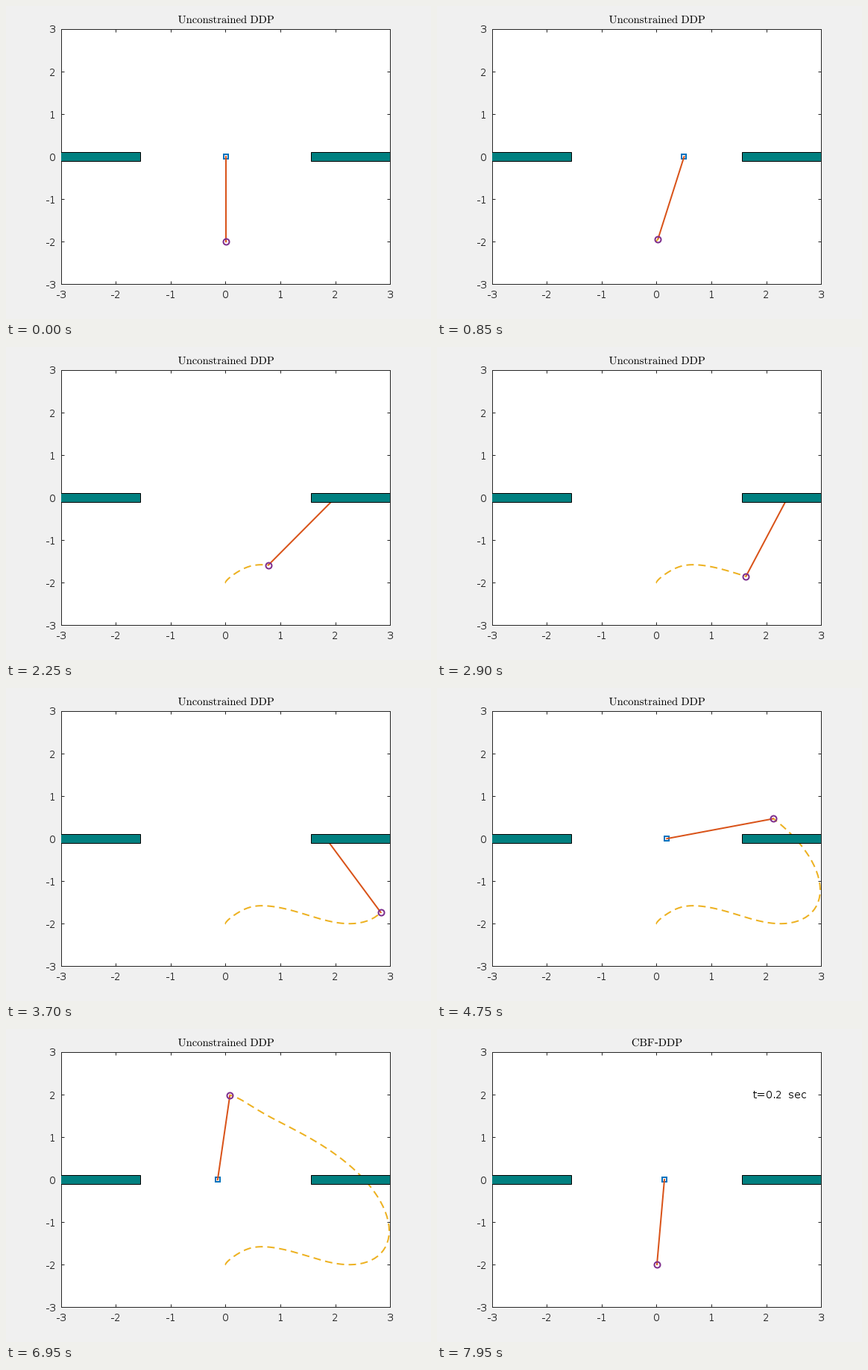
A matplotlib script for the animation above (8 s loop, 570x420 px).

```python
import numpy as np
import matplotlib.pyplot as plt
from matplotlib.animation import FuncAnimation
from matplotlib.patches import PathPatch, Rectangle
from matplotlib.textpath import TextPath
from matplotlib.transforms import Affine2D

W, H, DPI = 570, 420, 96
FRAMES, STEP_MS = 160, 50
SWITCH = 151          # frame at which the second run starts
DT = 0.02             # simulated seconds per step
ROD = 2.0
INK = "#262626"
BLUE, ORANGE, YELLOW, PURPLE = "#0072BD", "#D95319", "#EDB120", "#7E2F8E"

plt.rcParams.update({
    "font.family": "DejaVu Sans",
    "font.size": 10.5,
    "mathtext.fontset": "cm",
    "text.hinting": "default",
    "text.hinting_factor": 1,
})

# Key poses of the swing-up: (step, cart position, rod angle)
POSES = [(0, 0, 0), (17, .55, -.265), (31, 1.38, -.57), (43, 1.95, -.66),
         (57, 2.38, -.389), (73, 1.825, .521), (94, .18, 1.808),
         (118, -.565, 2.532), (149, 0, np.pi)]


def spline(x, y, t):
    """Smooth cubic spline through (x, y), at rest at both ends."""
    n, h, d = len(x), np.diff(x), np.diff(y) / np.diff(x)
    a, b = np.eye(n), np.zeros(n)
    for i in range(1, n - 1):
        a[i, i - 1:i + 2] = h[i], 2 * (h[i - 1] + h[i]), h[i - 1]
        b[i] = 3 * (h[i] * d[i - 1] + h[i - 1] * d[i])
    m = np.linalg.solve(a, b)
    i = np.clip(np.searchsorted(x, t, side="right") - 1, 0, n - 2)
    u = (t - x[i]) / h[i]
    return ((1 + 2 * u) * (1 - u) ** 2 * y[i] + u * (1 - u) ** 2 * h[i] * m[i]
            + u * u * (3 - 2 * u) * y[i + 1] + u * u * (u - 1) * h[i] * m[i + 1])


def run_data(cart, angle):
    return cart, cart + ROD * np.sin(angle), -ROD * np.cos(angle)


def swing_up():
    key, cart, angle = np.array(POSES).T
    steps = np.arange(SWITCH - 1)
    return run_data(spline(key, cart, steps), spline(key, angle, steps))


def pull_away():
    # The cart accelerates while the bob still hangs in place.
    cart = 0.136 * (np.arange(FRAMES - SWITCH) / 8) ** 2
    return run_data(cart, -np.arcsin(cart / ROD))


RUNS = [swing_up(), pull_away()]

fig = plt.figure(figsize=(W / DPI, H / DPI), dpi=DPI, facecolor="#f0f0f0")
ax = fig.add_axes([73.6 / W, 46.7 / H, 441.75 / W, 342.3 / H])
ax.set(xlim=(-3, 3), ylim=(-3, 3))
ticks = range(-3, 4)
ax.set_xticks(ticks, [str(v) for v in ticks])
ax.set_yticks(ticks, [str(v) for v in ticks])
ax.tick_params(direction="in", top=True, right=True, length=3.3, width=0.75,
               color=INK, labelcolor=INK, pad=5)
ax.tick_params(axis="x", pad=6)
for side in ax.spines.values():
    side.set(color=INK, linewidth=0.75)

for left in (-6, 1.55):
    ax.add_patch(Rectangle((left, -0.1), 4.45, 0.2, facecolor=(0, .5, .5),
                           edgecolor="black", linewidth=0.75, zorder=5))


def line(marker="", **style):
    """Empty plot line, unsnapped and centred on the pixel grid."""
    artist, = ax.plot([], [], marker, lw=1.5, mfc="none", mew=1.5, **style)
    artist.set_transform(Affine2D().translate(0.5, 0) + ax.transData
                         if False else ax.transData + Affine2D().translate(0.5, 0))
    artist.set_snap(False)
    return artist


cart = line("s", ms=4.9, mec=BLUE, zorder=3)
rod = line(color=ORANGE, zorder=3.1)
trace = line(color=YELLOW, dashes=(5, 3), dash_capstyle="butt", zorder=3.2)
bob = line("o", ms=6, mec=PURPLE, zorder=3.3, clip_on=False)


def make_title(text):
    path = TextPath((0, 0), text, size=11 * DPI / 72)
    box = path.get_extents()
    place = Affine2D().translate(295 - (box.x0 + box.x1) / 2, H - 23)
    return fig.add_artist(PathPatch(path, fc="black", lw=0, transform=place))


titles = [make_title(r"$\mathrm{Unconstrained\ DDP}$"),
          make_title(r"$\mathrm{CBF}$-$\mathrm{DDP}$")]
clock = fig.text(423.6 / W, 1 - 93 / H, "", va="baseline")


def draw(frame):
    run = int(frame >= SWITCH)
    k = frame - SWITCH if run else max(0, frame - 1)
    cx, bx, by = RUNS[run]
    cart.set_data([cx[k]], [0])
    rod.set_data([cx[k], bx[k]], [0, by[k]])
    trace.set_data(bx[:k + 1], by[:k + 1])
    bob.set_data([bx[k]], [by[k]])
    bob.set_visible(bx[k] <= 3)
    for i, title in enumerate(titles):
        title.set_visible(i == run)
    clock.set_text(f"t={k * DT:.1f}  sec" if run else "")
    return cart, rod, trace, bob, *titles, clock


anim = FuncAnimation(fig, draw, frames=FRAMES, interval=STEP_MS,
                     init_func=lambda: draw(0), repeat=True, repeat_delay=0)
plt.show()
```
